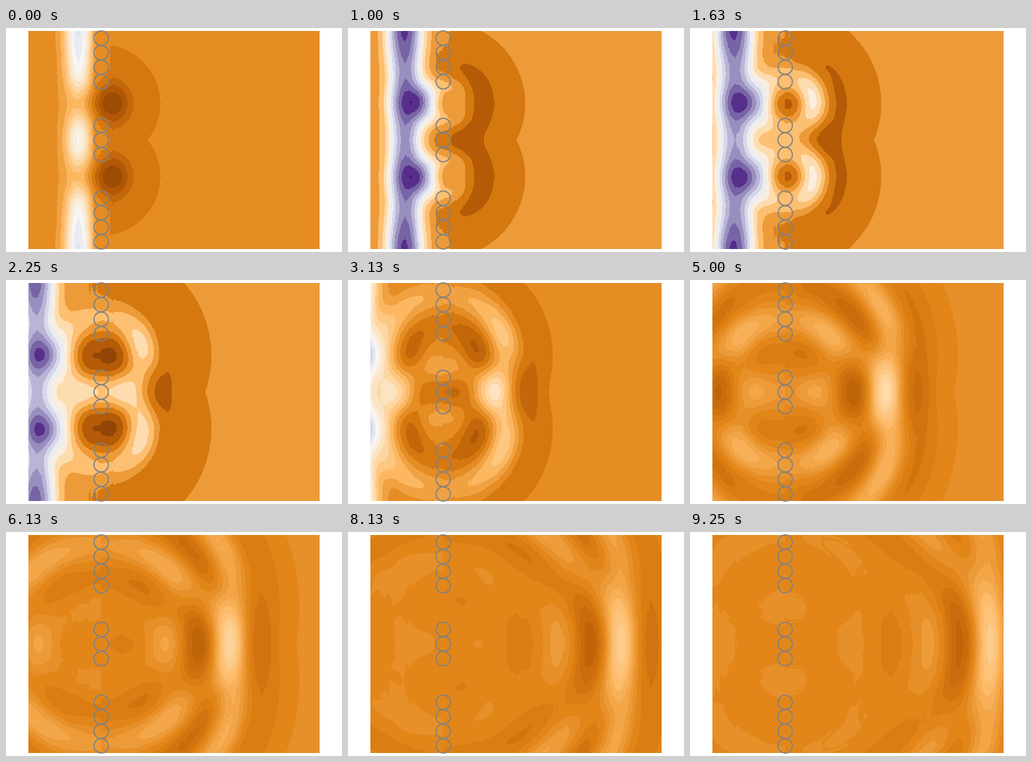
An HTML page without scripts for the animation above (9.37 s loop, 450x300 px).

```html
<!DOCTYPE html>
<html lang="en">
<head>
<meta charset="utf-8">
<title>Waves through two slits</title>
<style>
@property --t { syntax: "<number>"; inherits: true; initial-value: 0; }
html, body { margin: 0; width: 100%; height: 100%; overflow: hidden; background: #fff; }
svg {
  display: block; width: 450px; height: 300px;
  --x: calc(97 - 17 * var(--t) - 3.4 * var(--t) * var(--t));
  animation: clock 9.37s steps(75) infinite;
}
@keyframes clock { from { --t: 0; } to { --t: 9.37; } }

/* contour spacing gets finer as the field calms down */
#field { animation: levels 9.37s step-end infinite; }
@keyframes levels {
  0% { filter: url(#medium); }
  4% { filter: url(#coarse); }
  28% { filter: url(#medium); }
  37%, 100% { filter: url(#fine); }
}

/* b: birth time, k: decaying strength, f: lasting strength, c: cap */
.ring {
  --age: calc(var(--t) - var(--b));
  --c: .9;
  --k: 0;
  fill: none; stroke-width: 28;
  r: max(1px, calc(var(--age) * 32.1px));
  opacity: calc(min(var(--c), var(--k) / max(var(--age), .1) + var(--f)) * clamp(0, var(--age) * 3 + 1, 1));
}
.trough { stroke: url(#dark); }
.crest { stroke: url(#light); }

.halo { opacity: calc(.055 + .095 / (1 + var(--t))); }
.halo circle { r: calc(79px + var(--t) * 30.4px); }
.shade { opacity: clamp(0, (var(--t) - 2.6) * .06, .055); }

.strip {
  transform: translate(calc(var(--x) * 1px), 0) scaleX(calc(1 + .35 * min(var(--t), 1.5)));
  opacity: clamp(0, min(.36 + .32 * var(--t), .8 - .1 * var(--t)), 1);
}
.edge {
  transform: translate(calc((var(--x) - 2 * var(--t)) * 1px), 0);
  opacity: clamp(0, min(.12 + .4 * var(--t), .75 - .1 * var(--t)), 1);
}
.spot {
  transform: translate(calc((var(--x) + 18 - 6 * var(--t)) * 1px), 0);
  opacity: clamp(0, min(.9 * var(--t) - .1, .9 - .1 * var(--t)), 1);
}
.gap { opacity: clamp(0, .75 - 1.5 * var(--t), 1); }
.wall { opacity: clamp(0, 1.3 - .3 * var(--t), .85); }
.core { animation: core 9.37s infinite linear; }
@keyframes core {
  0% { opacity: .75; transform: translate(10px, 0); }
  7%, 17% { opacity: 0; transform: translate(-2px, 0); }
  24% { opacity: .7; transform: translate(-2px, 0); }
  33%, 100% { opacity: 0; transform: translate(-2px, 0); }
}
</style>
</head>
<body>
<svg viewBox="0 0 450 300">
  <defs>
    <radialGradient id="bump">
      <stop stop-color="#fff"/>
      <stop offset=".11" stop-color="#fff" stop-opacity=".95"/>
      <stop offset=".22" stop-color="#fff" stop-opacity=".8"/>
      <stop offset=".33" stop-color="#fff" stop-opacity=".61"/>
      <stop offset=".45" stop-color="#fff" stop-opacity=".4"/>
      <stop offset=".56" stop-color="#fff" stop-opacity=".24"/>
      <stop offset=".67" stop-color="#fff" stop-opacity=".14"/>
      <stop offset=".83" stop-color="#fff" stop-opacity=".04"/>
      <stop offset="1" stop-color="#fff" stop-opacity="0"/>
    </radialGradient>
    <linearGradient id="band" href="#bump" x1=".5" x2="1" spreadMethod="reflect"/>
    <radialGradient id="rest">
      <stop stop-color="#3a3a3a"/>
      <stop offset=".33" stop-color="#3a3a3a" stop-opacity=".61"/>
      <stop offset=".67" stop-color="#3a3a3a" stop-opacity=".14"/>
      <stop offset="1" stop-color="#3a3a3a" stop-opacity="0"/>
    </radialGradient>
    <linearGradient id="dark">
      <stop stop-opacity=".9"/>
      <stop offset=".15" stop-opacity=".55"/>
      <stop offset=".5" stop-opacity=".3"/>
      <stop offset=".85" stop-opacity=".6"/>
      <stop offset="1"/>
    </linearGradient>
    <linearGradient id="light">
      <stop stop-color="#fff" stop-opacity=".9"/>
      <stop offset=".15" stop-color="#fff" stop-opacity=".55"/>
      <stop offset=".5" stop-color="#fff" stop-opacity=".3"/>
      <stop offset=".85" stop-color="#fff" stop-opacity=".6"/>
      <stop offset="1" stop-color="#fff"/>
    </linearGradient>
    <linearGradient id="ahead">
      <stop offset=".2" stop-opacity="0"/>
      <stop offset=".5" stop-opacity=".25"/>
      <stop offset=".85" stop-opacity=".8"/>
      <stop offset="1"/>
    </linearGradient>

    <g id="slit">
      <circle class="ring" stroke="url(#ahead)" style="--b:-.69;--k:.95;--f:0;--c:.6"/>
      <circle class="ring crest" style="--b:.57;--k:.42;--f:.065;--c:.55"/>
      <circle class="ring trough" style="--b:1.8;--k:.4;--f:.2"/>
      <circle class="ring crest" style="--b:3.13;--k:.13;--f:.012"/>
      <circle class="ring trough" style="--b:4.57;--f:.06"/>
      <circle class="ring crest" style="--b:6.19;--f:.025"/>
      <circle class="ring trough" style="--b:7.5;--f:.035"/>
      <circle class="ring crest" style="--b:8.9;--f:.035"/>
      <ellipse class="core" rx="22" ry="17"/>
    </g>
    <circle id="post" r="9.75"/>

    <clipPath id="right"><path d="M127 0h330v300h-330z"/></clipPath>
    <filter id="soft" filterUnits="userSpaceOnUse" x="-60" y="-60" width="570" height="420" color-interpolation-filters="sRGB">
      <feGaussianBlur stdDeviation="10"/>
    </filter>
    <filter id="trim" filterUnits="userSpaceOnUse" x="90" y="-20" width="80" height="340">
      <feGaussianBlur stdDeviation="2.5"/>
    </filter>

    <filter id="coarse" filterUnits="userSpaceOnUse" x="30" y="4" width="390" height="292" color-interpolation-filters="sRGB">
      <feComponentTransfer><feFuncR type="discrete" tableValues=".036 .107 .179 .25 .321 .393 .464 .536 .607 .679 .75 .821 .893 .964"/></feComponentTransfer>
    </filter>
    <filter id="medium" filterUnits="userSpaceOnUse" x="30" y="4" width="390" height="292" color-interpolation-filters="sRGB">
      <feComponentTransfer><feFuncR type="discrete" tableValues=".02 .06 .1 .14 .18 .22 .26 .3 .34 .38 .42 .46 .5 .54 .58 .62 .66 .7 .74 .78 .82 .86 .9 .94 .98"/></feComponentTransfer>
    </filter>
    <filter id="fine" filterUnits="userSpaceOnUse" x="30" y="4" width="390" height="292" color-interpolation-filters="sRGB">
      <feComponentTransfer><feFuncR type="discrete" tableValues=".01 .03 .05 .07 .09 .11 .13 .15 .17 .19 .21 .23 .25 .27 .29 .31 .33 .35 .37 .39 .41 .43 .45 .47 .49 .51 .53 .55 .57 .59 .61 .63 .65 .67 .69 .71 .73 .75 .77 .79 .81 .83 .85 .87 .89 .91 .93 .95 .97 .99"/></feComponentTransfer>
    </filter>
    <filter id="palette" filterUnits="userSpaceOnUse" x="30" y="4" width="390" height="292" color-interpolation-filters="sRGB">
      <feColorMatrix values="1 0 0 0 0  1 0 0 0 0  1 0 0 0 0  0 0 0 1 0"/>
      <feComponentTransfer>
        <feFuncR type="table" tableValues=".498 .702 .878 .992 .996 .969 .847 .698 .502 .329 .176"/>
        <feFuncG type="table" tableValues=".231 .345 .51 .722 .878 .969 .855 .671 .451 .153 0"/>
        <feFuncB type="table" tableValues=".031 .024 .078 .388 .714 .969 .922 .824 .675 .533 .294"/>
      </feComponentTransfer>
    </filter>
  </defs>

  <g filter="url(#palette)">
    <g id="field">
      <rect width="450" height="300" fill="#3a3a3a"/>
      <g clip-path="url(#right)">
        <g class="halo"><circle cx="128" cy="101"/><circle cx="128" cy="199"/></g>
      </g>
      <rect class="shade" width="127" height="300"/>

      <rect class="strip" x="-36" width="72" height="300" fill="url(#band)"/>
      <g class="edge" fill="url(#bump)">
        <ellipse rx="42" ry="90"/><ellipse cy="300" rx="42" ry="90"/>
      </g>
      <g class="gap" fill="url(#rest)">
        <ellipse cx="97" cy="101" rx="75" ry="54"/><ellipse cx="97" cy="199" rx="75" ry="54"/>
      </g>
      <path class="wall" filter="url(#trim)" fill="#3a3a3a" d="M117-10h21v92h-21zM117 121h21v58h-21zM117 218h21v92h-21z"/>
      <g class="spot" fill="url(#bump)">
        <ellipse cy="100" rx="50" ry="52"/><ellipse cy="200" rx="50" ry="52"/>
      </g>

      <g filter="url(#soft)">
        <use href="#slit" x="128" y="101"/>
        <use href="#slit" x="128" y="199"/>
      </g>
    </g>
  </g>

  <g fill="none" stroke="#808080" stroke-width="1.5">
    <g id="posts">
      <use href="#post" x="127.5" y="13.5"/>
      <use href="#post" x="127.5" y="33"/>
      <use href="#post" x="127.5" y="52.5"/>
      <use href="#post" x="127.5" y="72"/>
      <use href="#post" x="127.5" y="130.5"/>
    </g>
    <use href="#post" x="127.5" y="150"/>
    <use href="#posts" transform="matrix(1 0 0 -1 0 300)"/>
  </g>
</svg>
</body>
</html>
```
